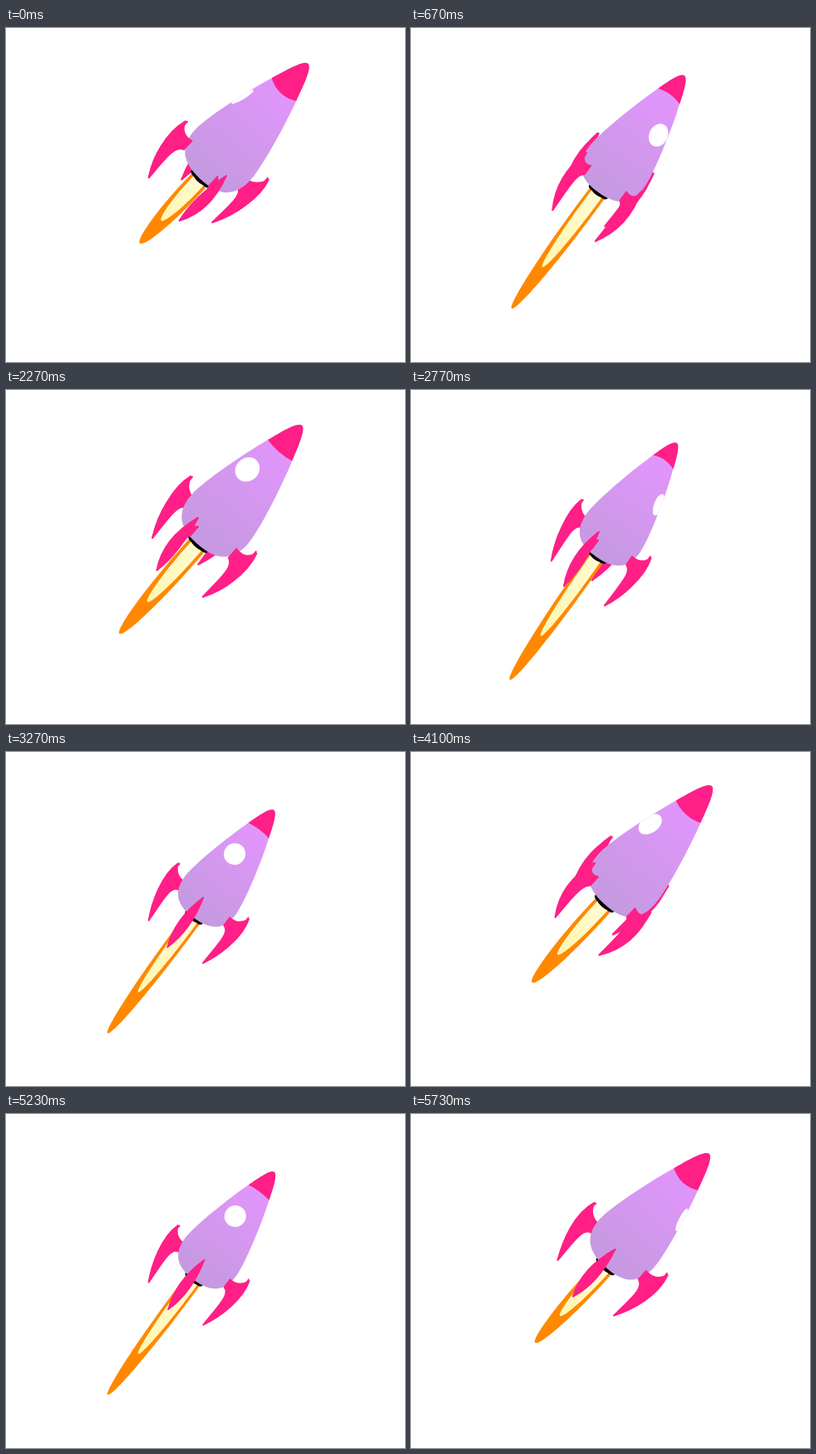
Write an HTML page with a canvas that moves like this. It is 480 px wide and 402 px high and loops after 5.76 s.

```html
<!DOCTYPE html>
<html lang="en">
<head>
<meta charset="utf-8">
<title>Rocket</title>
<style>
  html, body { margin: 0; width: 100%; height: 100%; overflow: hidden; background: #fff; }
  canvas { display: block; }
</style>
</head>
<body>
<canvas id="stage" width="480" height="402"></canvas>
<script>
const ctx = document.getElementById('stage').getContext('2d');
const LOOP = 5760, CYCLE = 1960, STEP = 1000 / 30;
const PINK = '#ff1f86', RAD = Math.PI / 180;
const BODY = 192;

const sin = deg => Math.sin(deg * RAD);
const cos = deg => Math.cos(deg * RAD);

// The rocket sways, shrinks and spins once per cycle; phase in degrees.
function poseAt(phase) {
  const wave = (mean, swing, lag = 0) => mean + swing * cos(phase - lag);
  return {
    noseX: wave(338.5, 25.3, 10),
    noseY: wave(56.5, -15.5, 30),
    tilt: wave(51.2, -4.3),
    length: wave(177.5, 16.5, 29),
    flame: 104 + 78 * Math.abs(sin(phase / 2)),
    spin: phase - 71 - 6 * sin(phase),
    bulge: wave(0, -7, -10),
    lean: wave(.34, .08, 30),
    finTip: wave(-37.5, 5),
  };
}

function fillPath(style, draw) {
  ctx.beginPath();
  draw();
  ctx.closePath();
  ctx.fillStyle = style;
  ctx.fill();
}

function fade(y0, c0, y1, c1) {
  const g = ctx.createLinearGradient(0, y0, 0, y1);
  g.addColorStop(0, c0);
  g.addColorStop(1, c1);
  return g;
}

function bodyPath() {
  ctx.moveTo(0, 2);
  ctx.bezierCurveTo(30, 2, 45, 14, 45, 42);
  ctx.bezierCurveTo(44.5, 66, 28.5, 125, 20, 150);
  ctx.bezierCurveTo(14, 168, 7, BODY, 0, BODY);
  ctx.bezierCurveTo(-7, BODY, -14, 168, -20, 150);
  ctx.bezierCurveTo(-28.5, 125, -44.5, 66, -45, 42);
  ctx.bezierCurveTo(-45, 14, -30, 2, 0, 2);
}

function flamePath(w, len) {
  ctx.moveTo(-w, -1);
  ctx.bezierCurveTo(-w * 1.1, -len * .5, -w * .6, -len, 0, -len);
  ctx.bezierCurveTo(w * .6, -len, w * 1.1, -len * .5, w, -1);
  ctx.quadraticCurveTo(0, -4, -w, -1);
}

function drawFin(angle, lean, tip) {
  const at = (r, y, side = 0) => [r * sin(angle) + side * cos(angle), y - lean * r * cos(angle)];
  const blade = (style, draw) => { fillPath(style, draw); ctx.stroke(); };
  ctx.strokeStyle = PINK;
  ctx.lineWidth = 2;
  ctx.lineJoin = 'round';
  blade(PINK, () => {
    ctx.moveTo(...at(49, tip));
    ctx.bezierCurveTo(...at(61, tip + 22), ...at(73, 22), ...at(64, 49));
    ctx.bezierCurveTo(...at(60, 38), ...at(52, 33), ...at(41, 34));
    ctx.lineTo(...at(41, 20));
    ctx.bezierCurveTo(...at(54, 18), ...at(50, -5), ...at(49, tip));
  });
  // thickness, seen when the fin faces the viewer
  const mid = tip / 2 + 24;
  blade(PINK, () => {
    ctx.moveTo(...at(49, tip));
    ctx.quadraticCurveTo(...at(69, mid, 14), ...at(62, 50));
    ctx.quadraticCurveTo(...at(69, mid, -14), ...at(49, tip));
  });
}

function drawPorthole(angle) {
  if (cos(angle) <= 0) return;
  fillPath('#fff', () =>
    ctx.ellipse(31 * sin(angle), 109, 15.5 * cos(angle), 15.5, sin(angle) * .28, 0, 7));
}

function drawNose(bulge) {
  const y = BODY - 38 + bulge / 2;
  fillPath(PINK, () => {
    ctx.moveTo(-22, y);
    ctx.quadraticCurveTo(0, y + 2 * bulge, 22, y);
    ctx.lineTo(22, 200);
    ctx.lineTo(-22, 200);
  });
}

function drawRocket(phase) {
  const { noseX, noseY, tilt, length, flame, spin, bulge, lean, finTip } = poseAt(phase);
  const s = length / BODY, dx = cos(tilt), dy = -sin(tilt);
  const fins = [0, 90, 180, 270].map(d => spin + d);
  const drawFins = list => list.forEach(angle => drawFin(angle, lean, finTip));

  // local space: nozzle at the origin, y along the axis towards the nose
  ctx.setTransform(-s * dy, s * dx, s * dx, s * dy, noseX - length * dx, noseY - length * dy);

  drawFins(fins.filter(f => cos(f) <= 0));
  fillPath('#000', () => ctx.ellipse(0, 2.5, 15, 5, 0, 0, 7));
  const outer = flame / s, inner = outer * .64;
  fillPath('#ff8800', () => flamePath(12, outer));
  fillPath(fade(0, '#fffbd2', -inner, '#fff6b0'), () => flamePath(8.2, inner));

  ctx.save();
  fillPath(fade(0, '#c49adf', 150, '#e095fb'), bodyPath);
  ctx.clip();
  drawPorthole(spin - 8);
  drawPorthole(spin + 172);
  drawNose(bulge);
  ctx.restore();

  drawFins(fins.filter(f => cos(f) > 0));
}

function frame(time) {
  const t = time % LOOP;
  const shown = t < 70 ? 0 : Math.floor((t + 5) / STEP) * STEP;
  ctx.setTransform(1, 0, 0, 1, 0, 0);
  ctx.fillStyle = '#fff';
  ctx.fillRect(0, 0, 480, 402);
  drawRocket(shown % CYCLE / CYCLE * 360);
}

const start = performance.now();
function tick() {
  frame(performance.now() - start);
  requestAnimationFrame(tick);
}
tick();
</script>
</body>
</html>
```
